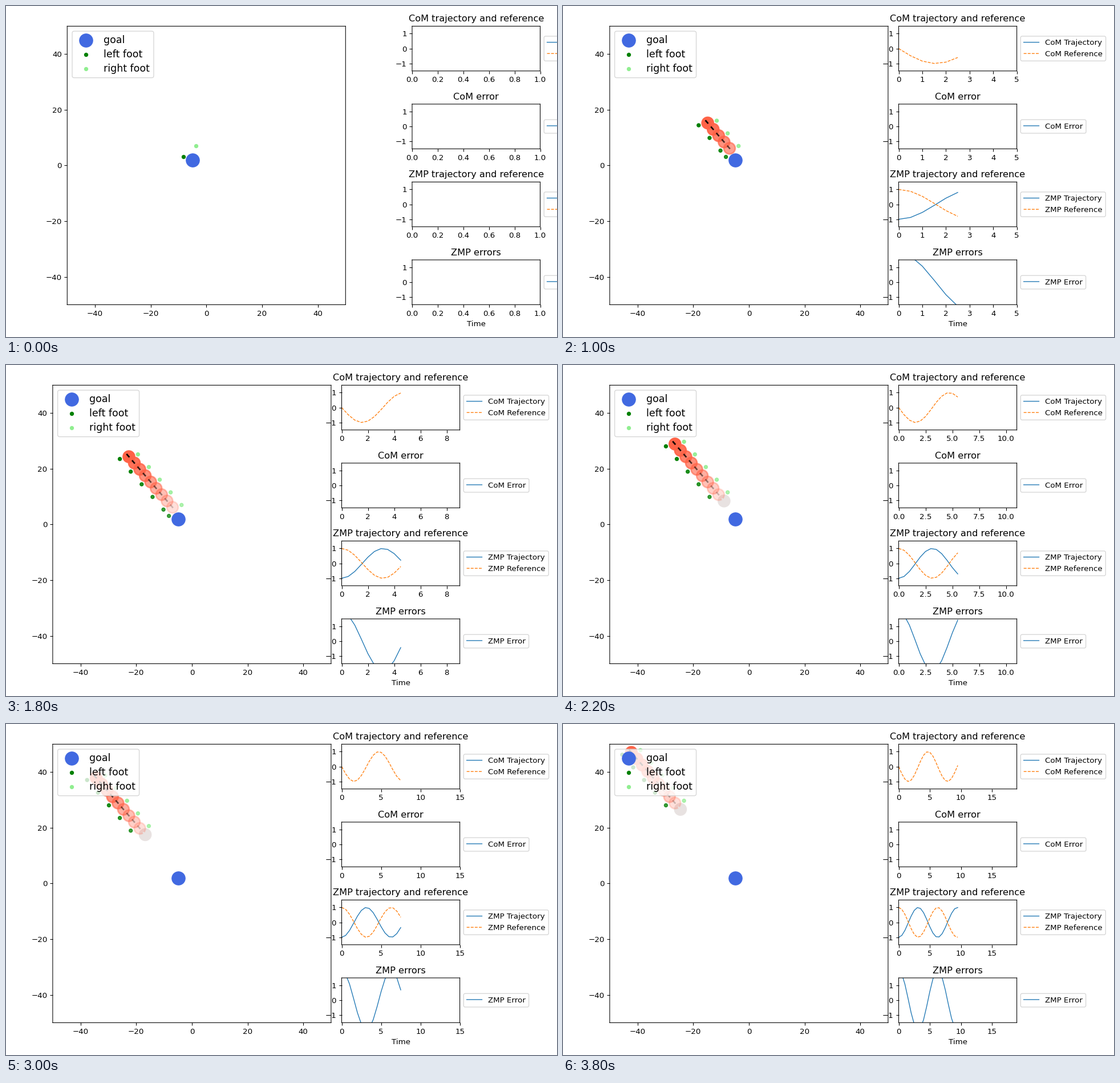
These frames come from a looping animation (966x580 px, 4000 ms). A matplotlib script:

```python
import numpy as np
import matplotlib.pyplot as plt
from matplotlib.animation import FuncAnimation
from matplotlib.collections import LineCollection
from matplotlib.colors import to_rgba

W, H, DPI = 966, 580, 96.6
STEPS, TRAIL, DT = 20, 10, 0.5
HEADING = np.radians(130.78)
START = np.array([-5.0, 3.89])
AHEAD = np.array([np.cos(HEADING), np.sin(HEADING)])
LEFT = np.array([-AHEAD[1], AHEAD[0]])
FADED = to_rgba("#e8e2e1")

plt.rcParams.update({"font.family": "DejaVu Sans", "font.size": 10,
                     "path.snap": False})
fig = plt.figure(figsize=(W / DPI, H / DPI), dpi=DPI, facecolor="white")


def place(ax, x, y, w, h):
    """Position axes by top-left corner and size in pixels."""
    ax.set_position([x / W, 1 - (y + h) / H, w / W, h / H])


def arrange(first):
    """The layout settles after the opening step."""
    place(field, 107.3 if first else 81.9, 35.4, 488, 488)
    x, w = (712, 224.5) if first else (588.5, 207.1)
    for k, ax in enumerate(plots):
        place(ax, x, 35.4 + 136.5 * k, w, 78.4)


def body_at(i):
    return START + 3 * i * AHEAD


def rgba(color, alphas):
    out = np.tile(to_rgba(color), (len(alphas), 1))
    out[:, 3] = alphas
    return out


# Walking field
field = fig.add_axes([0, 0, 1, 1])
field.set(xlim=(-50, 50), ylim=(-50, 50))
field.scatter(-5, 2, s=300, lw=1, color="royalblue", label="goal")
left_foot = field.scatter(0, 0, s=20, lw=1, color="green", label="left foot")
right_foot = field.scatter(0, 0, s=20, lw=1, color="lightgreen",
                           label="right foot")
body = field.scatter([], [], s=220, lw=2)
marks = field.add_collection(
    LineCollection([], linewidths=2, capstyle="projecting", zorder=2))
field.legend(loc="upper left", fontsize=13, labelspacing=0.41, borderpad=0.38)

# Time plots: title, then (label, style, function) per curve
SPECS = [
    ("CoM trajectory and reference",
     [("CoM Trajectory", "C0-", None),
      ("CoM Reference", "C1--", lambda t: -np.sin(t))]),
    ("CoM error", [("CoM Error", "C0-", None)]),
    ("ZMP trajectory and reference",
     [("ZMP Trajectory", "C0-", lambda t: -np.cos(t)),
      ("ZMP Reference", "C1--", np.cos)]),
    ("ZMP errors", [("ZMP Error", "C0-", lambda t: 2 * np.cos(t))]),
]
plots, curves = [], []
for title, lines in SPECS:
    ax = fig.add_axes([0, 0, 1, 1], label=title)
    ax.set_title(title)
    for label, style, func in lines:
        line, = ax.plot([], [], style, lw=1, label=label)
        if func:
            curves.append((line, func))
    ax.set(ylim=(-1.5, 1.5), yticks=[-1, 0, 1])
    ax.legend(loc="center left", bbox_to_anchor=(1, 0.5))
    plots.append(ax)
plots[-1].set_xlabel("Time")


def show_feet(dots, steps, side, color, now):
    steps = [k for k in steps if 0 <= now - k < TRAIL]
    dots.set_offsets([body_at(k) + 1.5 * AHEAD + 3 * side * LEFT
                      for k in steps])
    tint = rgba(color, [1 - 0.03 * (now - k) for k in steps])
    dots.set_facecolors(tint)
    dots.set_edgecolors(tint)


def update(i):
    arrange(i == 0)

    show_feet(left_foot, [0, *range(1, STEPS, 2)], 1, "green", i)
    show_feet(right_foot, range(0, STEPS, 2), -1, "lightgreen", i)

    steps = np.arange(max(1, i - TRAIL + 1), i + 1)
    alphas = 1 - (i - steps) / TRAIL
    centers = np.array([body_at(k) for k in steps]).reshape(-1, 2)
    tint, ink = rgba("tomato", alphas), rgba("black", alphas)
    if len(steps) == TRAIL:
        tint[0] = ink[0] = FADED
    body.set_offsets(centers)
    body.set_facecolors(tint)
    body.set_edgecolors(tint)
    marks.set_segments([[c, c + AHEAD] for c in centers])
    marks.set_colors(ink)

    t = DT * np.arange(i + 1)
    for line, func in curves:
        line.set_data(t, func(t))
    for ax in plots:
        ax.set_xlim(0, max(1, 2 * t[-1]))
    return []


anim = FuncAnimation(fig, update, frames=STEPS, interval=200,
                     init_func=lambda: update(0), repeat=True, repeat_delay=0)
plt.show()
```
